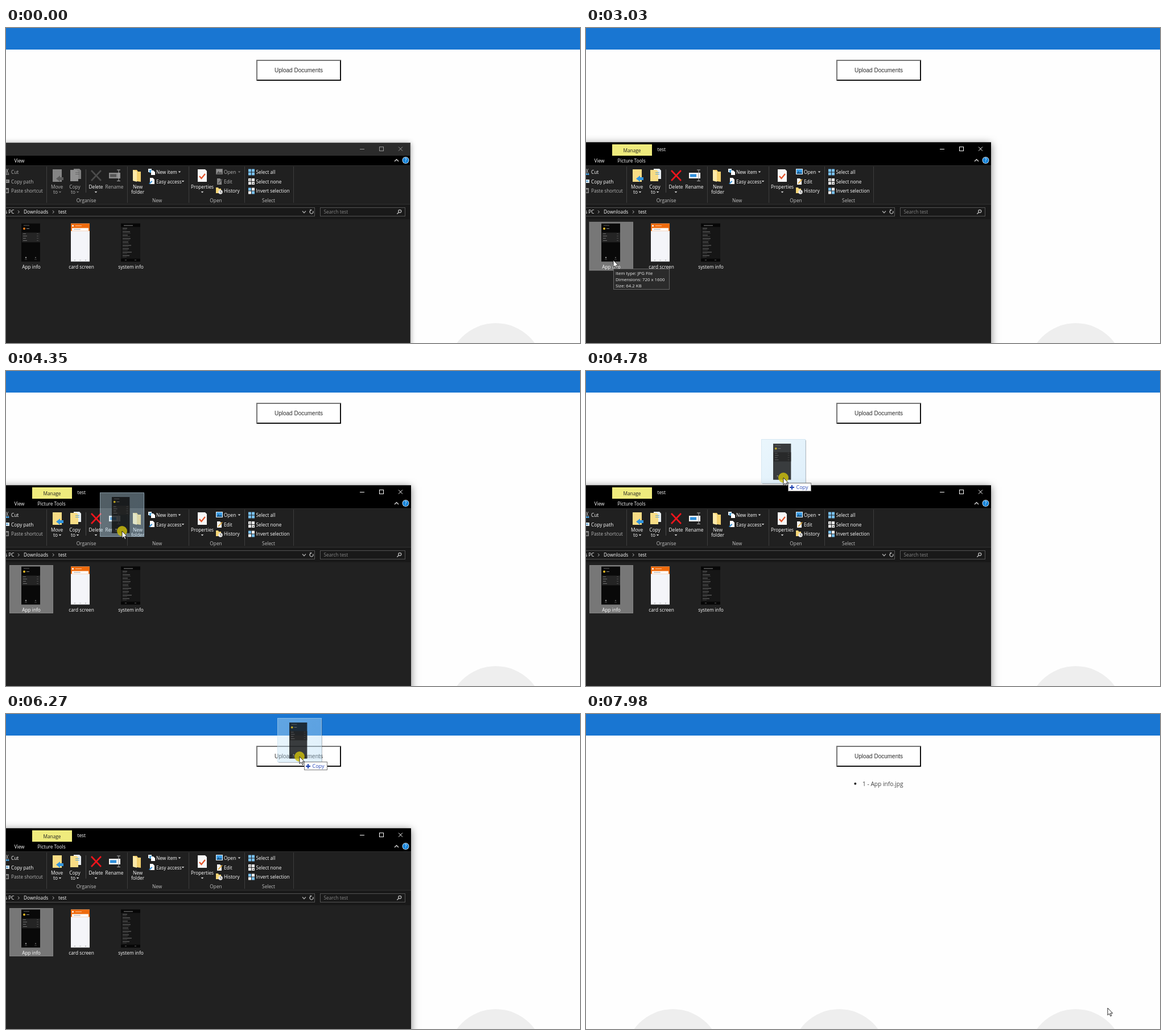
An HTML page with a canvas for the animation above (8 s loop, 1009 px wide and 555 px high).

```html
<!DOCTYPE html>
<html lang="en">
<head>
<meta charset="utf-8">
<title>Drag a document to upload</title>
<style>
html, body { margin: 0; width: 100%; height: 100%; overflow: hidden; background: #fefefe; }
canvas { display: block; }
</style>
</head>
<body>
<canvas id="stage" width="1009" height="555"></canvas>
<script>
const ctx = document.getElementById('stage').getContext('2d');
const LOOP = 8000, DROP = 6650;

// Pointer tip: time, x, y
const PATH = [
  [340, 859, 535], [650, 520, 400], [880, 300, 334], [1120, 150, 374], [1300, 71, 394],
  [1960, 71, 394], [2270, 50, 396], [2480, 50, 398], [2830, 48, 409], [3380, 48, 409],
  [3420, 52, 409], [3820, 99, 361], [4220, 168, 307], [4780, 347, 188], [5025, 404, 147],
  [5260, 466, 104], [5835, 503, 80], [6270, 516, 75], [6890, 516, 75], [7080, 494, 135],
  [7250, 484, 215], [7450, 510, 320], [7695, 573, 416], [7980, 917, 518]
];

// Monotone cubic interpolation along one axis of the path
function along(t, axis) {
  const last = PATH.length - 1;
  if (t <= PATH[0][0]) return PATH[0][axis];
  if (t >= PATH[last][0]) return PATH[last][axis];
  const i = PATH.findIndex(p => p[0] > t) - 1;
  const slope = k => k < 0 || k >= last ? 0 : (PATH[k + 1][axis] - PATH[k][axis]) / (PATH[k + 1][0] - PATH[k][0]);
  const tangent = k => {
    const a = slope(k - 1), b = slope(k);
    return a * b > 0 ? 2 * a * b / (a + b) : 0;
  };
  const h = PATH[i + 1][0] - PATH[i][0], u = (t - PATH[i][0]) / h, v = 1 - u;
  return PATH[i][axis] * (1 + 2 * u) * v * v + PATH[i + 1][axis] * u * u * (3 - 2 * u)
    + h * u * v * (tangent(i) * v - tangent(i + 1) * u);
}

function rect(x, y, w, h, color) {
  ctx.fillStyle = color;
  ctx.fillRect(x, y, w, h);
}
function frame(x, y, w, h, color) {
  ctx.strokeStyle = color;
  ctx.lineWidth = 1;
  ctx.strokeRect(x + .5, y + .5, w - 1, h - 1);
}
function disc(x, y, r, color) {
  ctx.fillStyle = color;
  ctx.beginPath();
  ctx.arc(x, y, r, 0, 7);
  ctx.fill();
}
function shape(points, fill, stroke, width = 1) {
  ctx.beginPath();
  for (let i = 0; i < points.length; i += 2) ctx.lineTo(points[i], points[i + 1]);
  if (fill) { ctx.closePath(); ctx.fillStyle = fill; ctx.fill(); }
  if (stroke) { ctx.strokeStyle = stroke; ctx.lineWidth = width; ctx.stroke(); }
}
function text(s, x, y, color = '#fff', align = 'left', font = '8.3px "Open Sans", sans-serif') {
  ctx.font = font;
  ctx.textAlign = align;
  ctx.fillStyle = color;
  ctx.fillText(s, x, y + 3);
}
const arrow = (x, y, color = '#ddd') => shape([x - 2.3, y - 1, x + 2.3, y - 1, x, y + 1.6], color);
const page = (x, y, w, h, color) => shape([x, y, x + w - 3, y, x + w, y + 3, x + w, y + h, x, y + h], color);

function drawPage(listed) {
  rect(0, 0, 1009, 555, '#fefefe');
  rect(0, 0, 1009, 38, '#1976d2');
  for (const x of [153, 445, 861]) disc(x, 604, 84, '#eee');
  rect(440, 56, 149, 37, '#fff');
  shape([440, 93, 440, 56, 589, 56, 587, 58, 442, 58, 442, 91], '#767676');
  shape([589, 56, 589, 93, 440, 93, 442, 91, 587, 91, 587, 58], '#111');
  text('Upload Documents', 514.5, 75.4, '#2c2c2c', 'center', '10px "Liberation Sans", Arial, sans-serif');
  if (listed) {
    disc(473.3, 122.7, 2, '#222');
    text('1 - App info.jpg', 486, 123.7, '#444', 'left', '10.2px "Open Sans", sans-serif');
  }
}

// Thumbnails use a 33 x 66 box
function appThumb(dot) {
  rect(0, 0, 33, 67, '#090909');
  rect(4, 3, 10, .8, '#777');
  disc(5, 9, 2, dot);
  rect(9, 8.5, 5, 1, '#888');
  rect(1, 16, 32, 17, '#242424');
  for (let i = 0; i < 4; i++) {
    rect(3, 17.5 + i * 4, 5 + i % 2 * 2, .9, '#777');
    rect(27, 17.5 + i * 4, 3, .8, '#555');
  }
  disc(8, 60, 1.2, '#999');
  disc(25, 60, 1.1, '#666');
  rect(6, 63, 4, .7, '#666');
  rect(23, 63, 4, .7, '#555');
}
function cardThumb() {
  rect(0, 0, 33, 67, '#f4f5f9');
  rect(0, 0, 33, 13, '#ee6a0c');
  disc(3.5, 4, 1.6, '#fff');
  rect(8, 3.5, 11, 1, '#ffc79b');
  rect(2, 8, 29, 5, '#fff');
  rect(5, 10, 12, .8, '#888');
  rect(6, 64, 2, 1, '#999');
  rect(15, 64, 3, 1, '#bbb');
  rect(25, 64, 2, 1, '#999');
}
function systemThumb() {
  rect(0, 0, 34, 67, '#161616');
  rect(0, 0, 34, 6, '#070707');
  rect(5, 3, 16, 1, '#888');
  for (let i = 0; i < 9; i++) {
    rect(3, 8 + i * 6, 8 + i * 5 % 9, 1, '#777');
    rect(3, 10.5 + i * 6, 7 + i * 7 % 8, .7, '#484848');
  }
  rect(0, 62, 34, 5, '#060606');
  rect(7, 64, 3, .8, '#777');
  rect(24, 64, 3, .8, '#777');
}
function at(x, y, scale, draw) {
  ctx.save();
  ctx.translate(x, y);
  ctx.scale(scale, scale);
  draw();
  ctx.restore();
}

function drawRibbon(picked) {
  const pick = (on, off) => picked ? on : off;
  const label = pick('#fff', '#b5b5b5');
  for (const x of [71, 213, 321, 419, 505]) rect(x, 244, 1, 64, '#3d3d3d');
  rect(140, 249, 1, 41, '#4a4a4a');

  const blue = pick('#48a5e8', '#777');
  shape([0, 248, 4, 256], null, '#aaa');
  shape([4, 248, 0, 256], null, '#aaa');
  disc(1, 257.5, 1.5, blue);
  disc(4, 257.5, 1.5, blue);
  rect(-3, 267, 9, 6, pick('#d8e6f0', '#888'));
  rect(-2, 269, 6, 1.5, pick('#3d91d0', '#555'));
  rect(-3, 282, 8, 9, '#888');
  rect(0, 284.5, 3.5, 5, '#333');
  text('Cut', 9, 254, label);
  text('Copy path', 9, 270.5, label);
  text('Paste shortcut', 9, 287, '#b5b5b5');

  rect(82, 249, 16, 22, pick('#f8dc85', '#858585'));
  shape([101, 263, 95, 263, 95, 260, 88, 265.5, 95, 271, 95, 268, 101, 268], pick('#3295df', '#5b5b5b'));
  page(119, 248, 13, 18, pick('#e6edf2', '#808080'));
  page(113, 250, 14, 20, pick('#f8dc85', '#909090'));
  rect(122, 254, 7, 1, pick('#5ba5d8', '#666'));
  rect(122, 257, 7, 1, pick('#5ba5d8', '#666'));
  text('Move', 89.5, 279.5, label, 'center');
  text('to', 87, 289, label, 'center');
  text('Copy', 121, 279.5, label, 'center');
  text('to', 118, 289, label, 'center');
  arrow(95, 289, pick('#ddd', '#777'));
  arrow(126, 289, pick('#ddd', '#777'));

  const cross = pick('#f0151c', '#4b4b4b');
  shape([150, 251, 167, 269], null, cross, 2.6);
  shape([167, 251, 150, 269], null, cross, 2.6);
  text('Delete', 158, 279.5, '#fff', 'center');
  arrow(158, 289);
  rect(181, 255, 20, 10, pick('#f2f2f2', '#8a8a8a'));
  rect(183, 257.5, 11, 5, pick('#2f8fdc', '#555'));
  shape([195, 250, 201, 250], null, '#aaa');
  rect(197.5, 250, 1, 19, '#aaa');
  shape([195, 269.5, 201, 269.5], null, '#aaa');
  text('Rename', 190.5, 279.5, label, 'center');

  shape([223, 250, 230, 250, 232, 253, 237, 253, 237, 271, 223, 269], '#f3d06d');
  shape([223, 250, 230, 253, 230, 271, 223, 269], '#fce9a8');
  text('New', 231.5, 279.5, '#fff', 'center');
  text('folder', 231.5, 289, '#fff', 'center');

  rect(250, 248, 6, 6, '#e7eef4');
  rect(252, 250, 5, 5, '#4b9fd8');
  page(255, 251, 7, 8, '#fff');
  text('New item', 264, 254);
  arrow(305, 253.5);
  page(253, 264, 8, 11, '#fff');
  shape([251, 274, 256, 269, 257.5, 270.5, 253, 275], '#3d96db');
  text('Easy access', 264, 270.5);
  arrow(311, 270);

  page(337, 249, 16, 22, '#f7f7f7');
  shape([340, 261, 343.5, 265, 350, 257], null, '#e2542b', 2.2);
  text('Properties', 345, 279.5, '#fff', 'center');
  arrow(345, 289);

  rect(369, 248, 12, 10, pick('#e9f4fb', '#707070'));
  rect(370, 249, 10, 8, pick('#3d9fe8', '#909090'));
  shape([370, 257, 373.5, 252, 376, 255, 378, 253, 380, 257], pick('#1a5b8f', '#555'));
  text('Open', 383, 254, label);
  arrow(410, 253.5, pick('#ddd', '#777'));
  page(371, 265, 8, 11, pick('#f5f5f5', '#858585'));
  shape([373, 274, 380, 266.5], null, pick('#e0a633', '#555'), 1.8);
  text('Edit', 383, 270.5, label);
  shape([369, 281, 373, 281, 374, 283, 378, 283, 378, 291, 369, 291], '#f4d577');
  disc(377, 289, 3.7, '#e6e6e6');
  shape([377, 286.5, 377, 289, 379, 290], null, '#444', .8);
  text('History', 383, 287);

  const tiles = (y, first, second) => {
    for (let i = 0; i < 4; i++)
      rect(426 + i % 2 * 6, y + (i >> 1) * 6, 5, 5, i === 0 || i === 3 ? first : second);
  };
  tiles(248.5, '#79c2f2', '#79c2f2');
  tiles(265, '#e9e9e9', '#e9e9e9');
  tiles(281.5, '#79c2f2', '#f4f4f4');
  rect(428, 267, 1.5, 1.5, '#222');
  rect(434, 273, 1.5, 1.5, '#222');
  text('Select all', 439.5, 254);
  text('Select none', 439.5, 270.5);
  text('Invert selection', 439.5, 287);

  [['Organise', 141], ['New', 265.5], ['Open', 369], ['Select', 461.5]]
    .forEach(([name, x]) => text(name, x, 304, '#c0c0c0', 'center'));
}

function drawExplorer(active, picked, hovered) {
  const right = active ? 712 : 711, top = active ? 201.5 : 202;
  ctx.save();
  ctx.shadowColor = active ? 'rgba(0,0,0,.5)' : 'rgba(0,0,0,.4)';
  ctx.shadowBlur = active ? 13 : 9;
  ctx.shadowOffsetY = 1;
  rect(-30, top, right + 30, 400, '#212121');
  ctx.restore();
  rect(0, top, right, 24, active ? '#000' : '#2b2b2b');
  rect(0, 225, right, 17, '#000');
  rect(0, 242, right, 69, '#202020');
  rect(0, 242, right, 1, '#2d2d2d');
  rect(0, 310, right, 27, '#191919');
  rect(0, 310, right, 1, '#303030');
  if (!active) {
    rect(710, 202, 1, 353, '#4a4a4a');
    rect(0, 202, 711, 1, '#4a4a4a');
  }

  const caption = active ? '#fff' : '#999';
  rect(622, 213, 8, 1, caption);
  frame(656, 209, 8, 8, caption);
  shape([690, 209.5, 697, 216.5], null, caption);
  shape([697, 209.5, 690, 216.5], null, caption);
  text('View', 14.5, 234);
  shape([683, 235, 686.5, 231.5, 690, 235], null, '#ccc', 1.5);
  disc(702.5, 233, 6, '#e8f3fc');
  disc(702.5, 233, 5.2, '#1683d8');
  text('?', 702.5, 233.3, '#fff', 'center');
  if (picked) {
    rect(46, 205, 70, 20, '#efeb7d');
    text('Manage', 81, 215.5, '#222', 'center');
    text('test', 125.5, 214);
    text('Picture Tools', 80, 234, '#fff', 'center');
  }

  drawRibbon(picked);

  frame(-5, 316, 548, 16, '#535353');
  frame(552, 316, 150, 16, '#535353');
  text('This PC', 14.5, 324, '#fff', 'right');
  text('Downloads', 31, 324);
  text('test', 92, 324);
  for (const x of [22, 83]) shape([x - 1, 321.5, x + 1.3, 324, x - 1, 326.5], null, '#bbb');
  shape([521, 322.5, 524, 325.7, 527, 322.5], null, '#aaa', 1.3);
  ctx.beginPath();
  ctx.arc(537, 324, 3, -.6, 4.2);
  ctx.strokeStyle = '#aaa';
  ctx.stroke();
  shape([534, 319.5, 538, 320, 535.5, 323], '#aaa');
  text('Search test', 558.5, 324, '#858585');
  ctx.beginPath();
  ctx.arc(692.3, 322.8, 2.5, 0, 7);
  ctx.strokeStyle = '#bbb';
  ctx.stroke();
  shape([690.5, 324.8, 687.3, 327.8], null, '#bbb', 1.4);

  if (hovered >= 0) rect(5 + hovered * 88, 341, 78, 87, '#4d4d4d');
  if (picked) {
    rect(6, 342, 77, 85, '#777');
    frame(6, 342, 77, 85, '#828282');
  }
  at(27, 344.5, 1, () => appThumb(picked ? '#e8b923' : '#ec7a1c'));
  at(114, 344.5, 1, cardThumb);
  at(202, 344.5, 1, systemThumb);
  text('App info', 44.5, 420.5, '#fff', 'center');
  text('card screen', 132.5, 420.5, '#fff', 'center');
  text('system info', 219.5, 420.5, '#fff', 'center');
}

function drawTooltip() {
  rect(48, 424, 99, 37, '#2b2b2b');
  frame(48, 424, 99, 37, '#666');
  ['Item type: JPG File', 'Dimensions: 720 x 1600', 'Size: 64.2 KB']
    .forEach((s, i) => text(s, 52, 431.5 + i * 11, '#eee', 'left', '7.8px "Open Sans", sans-serif'));
}

function drawGhost(x, y) {
  const left = x - 39, top = y - 68;
  const tint = ctx.createLinearGradient(left, top, left + 78, top + 78);
  tint.addColorStop(0, 'rgba(205,235,250,.4)');
  tint.addColorStop(1, 'rgba(180,218,245,.42)');
  rect(left, top, 78, 78, tint);
  frame(left, top, 78, 78, 'rgba(190,215,230,.45)');
  rect(left + 2, top + 78, 77, 1, 'rgba(60,70,80,.35)');
  rect(left + 78, top + 2, 1, 76, 'rgba(60,70,80,.35)');
  ctx.globalAlpha = .78;
  at(left + 21, top + 8, .95, () => appThumb('#e8c723'));
  ctx.globalAlpha = 1;
}

function drawCopyLabel(x, y) {
  rect(x, y, 41, 15, '#fff');
  frame(x, y, 41, 15, '#777');
  rect(x + 3, y + 7, 8, 2, '#1b3fb0');
  rect(x + 6, y + 4, 2, 8, '#1b3fb0');
  text('Copy', x + 14.5, y + 8, '#2a49b8', 'left', '9px "Open Sans", sans-serif');
}

function drawPointer(x, y) {
  ctx.lineJoin = 'miter';
  const outline = [0, 0, 0, 12.5, 2.9, 9.9, 4.9, 14.4, 6.9, 13.5, 4.9, 9.2, 8.7, 9.2]
    .map((v, i) => v + (i % 2 ? y : x));
  shape(outline.concat(outline[0], outline[1]), '#fff', '#111', .9);
}

function draw(t) {
  const x = Math.round(along(t, 1)), y = Math.round(along(t, 2));
  const dragging = t >= 3410 && t < DROP;
  const inRow = t >= 340 && !dragging && y >= 341 && y < 428;
  const hovered = inRow ? [5, 93, 181].findIndex(left => x >= left && x < left + 78) : -1;

  drawPage(t >= 6700);
  if (t < 6670) drawExplorer(t >= 1500, t >= 1700, hovered);
  if (t >= 3030 && t < 3210) drawTooltip();
  if (dragging) drawGhost(x, y);
  if (t >= 1500 && t < 1600 || t >= 3210 && t < DROP) disc(x, y, 9, 'rgba(205,190,12,.82)');
  if (dragging && y < 201) drawCopyLabel(x + 8, y + 9);
  if (t >= 340) drawPointer(x, y);
}

function tick() {
  draw(performance.now() % LOOP);
  requestAnimationFrame(tick);
}
tick();
</script>
</body>
</html>
```
